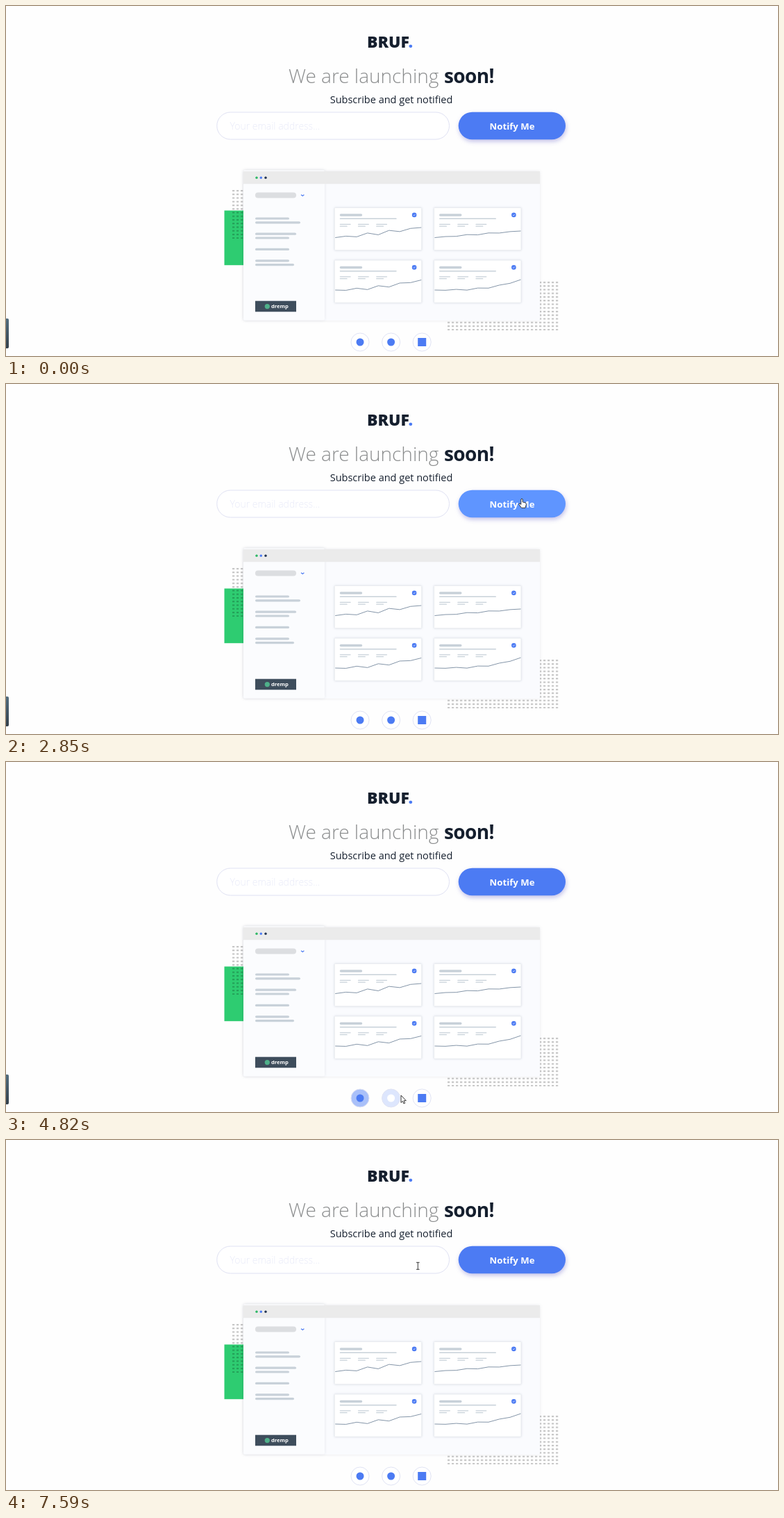
Recreate the animation shown at these times as an HTML page. Size 1112 by 504 pixels, loop 8000 ms.

```html
<!DOCTYPE html>
<html lang="en">
<head>
<meta charset="utf-8">
<title>Launching soon</title>
<style>
  html, body { margin: 0; width: 100%; height: 100%; overflow: hidden; background: #fefefe; }
  svg { display: block; width: 100%; height: 100%; }
  text { font-family: "Open Sans", "Noto Sans", sans-serif; }
  .light { font-weight: 300; }
  .bold { font-weight: 700; }
  .bar { fill: #c8d1d9; }
  .chart { fill: none; stroke: #8495a8; stroke-width: 1; stroke-linejoin: round; }
  .card { fill: #fff; stroke: #e9ecf0; filter: drop-shadow(0 0 1.5px rgba(60, 80, 110, .16)); }
  .panel { filter: drop-shadow(0 0 2px rgba(40, 50, 80, .1)); }
  .ring { stroke: #e0e3f4; }
  #button { filter: drop-shadow(1px 3px 3px rgba(70, 65, 190, .32)); }
  #cursor > * { display: none; stroke: #222; stroke-width: .9; fill: #fff; stroke-linejoin: round; }
  #tab { animation: tab 8s step-end infinite; }
  @keyframes tab { 91% { opacity: 0; } }
</style>
</head>
<body>
<svg viewBox="0 0 1112 504">
  <defs>
    <pattern id="dots" width="6" height="5.25" patternUnits="userSpaceOnUse">
      <rect width="3.2" height="2" fill="#000" opacity=".23"/>
    </pattern>
    <linearGradient id="slate" x2="0" y2="1">
      <stop stop-color="#526d7e"/><stop offset="1" stop-color="#323f4a"/>
    </linearGradient>
  </defs>

  <text x="520" y="59.5" font-size="23" font-weight="800" fill="#151f2e">BRUF<tspan fill="#4c7bf3">.</tspan></text>
  <text class="light" x="407" y="111" font-size="28" fill="#8a8c8d">We are launching</text>
  <text class="bold" x="631" y="111" font-size="28" letter-spacing="-.6" fill="#151f2e">soon!</text>
  <text x="555" y="139.5" font-size="14.5" text-anchor="middle" fill="#151f2e">Subscribe and get notified</text>

  <rect x="303.8" y="153" width="334.7" height="39" rx="19.5" fill="#fff" stroke="#dfe1f3"/>
  <text class="light" x="322.5" y="177.5" font-size="14" fill="#e8eaf8">Your email address...</text>
  <rect id="button" x="651.7" y="152.7" width="154.3" height="39.6" rx="19.8"/>
  <text class="bold" x="729" y="177.5" font-size="13.2" text-anchor="middle" fill="#fff">Notify Me</text>

  <rect x="314.5" y="294.5" width="30" height="78.7" fill="#2ecc71"/>
  <g fill="url(#dots)">
    <rect width="18" height="70" transform="translate(326 265)"/>
    <rect width="161" height="70" transform="translate(636 397)"/>
  </g>
  <g class="panel">
    <rect x="342" y="238" width="427" height="215" rx="2" fill="#fafbfe"/>
    <rect x="342" y="236.5" width="117" height="216" rx="2" fill="#fbfcfe" class="panel"/>
    <path d="M342 238H769V256.3H342Z" fill="#ebebeb"/>
  </g>
  <circle cx="361" cy="247.2" r="1.7" fill="#2eb865"/>
  <circle cx="367.3" cy="247.2" r="1.7" fill="#4c7bf3"/>
  <circle cx="374" cy="247.2" r="1.7" fill="#243552"/>
  <rect x="359" y="268.6" width="59" height="7.8" rx="3.9" fill="#dcdee1"/>
  <path d="M425 271.8l2.2 1.7 2.2-1.7" fill="none" stroke="#4c7bf3" stroke-width="1.1"/>
  <g id="menu"></g>
  <rect x="359" y="424.7" width="59" height="15.6" fill="#3e4d5c"/>
  <circle cx="376.3" cy="432.6" r="3.6" fill="#4fb08a"/>
  <text class="bold" x="382" y="435.4" font-size="7.6" fill="#fff">dremp</text>
  <g id="cards"></g>
  <g id="social"></g>

  <path id="tab" d="M0 450H2Q4 450 4 452V491Q4 493 2 493H0Z" fill="url(#slate)"/>
  <g id="cursor">
    <path d="M0 0V10.5L2.4 8.3 4 12 5.7 11.2 4.1 7.7H7.3Z"/>
    <path d="M-1.2 1Q0-.8 1.2 1V5L5 5.8Q6.5 6.4 6.3 8.5L5 13.4H-.5L-4 8.6Q-4.6 7-3 7L-1.2 8.5Z"/>
    <path d="M-2.3-5H2.3M-2.3 5H2.3M0-5V5" style="fill:none"/>
  </g>
</svg>
<script>
const el = id => document.getElementById(id);
const LOOP = 8000;

const bar = (x, y, w, h) =>
  `<rect class="bar" x="${x}" y="${y}" width="${w}" height="${h}" rx="${h / 2}"/>`;

function menu(groups) {
  let y = 304.4, out = '';
  for (const widths of groups) {
    for (const w of widths) {
      out += bar(359, y, w, 3.2);
      y += 5.8;
    }
    y += 10.6;
  }
  return out;
}
el('menu').innerHTML = menu([[49, 65], [59, 49], [49], [49, 56]]);

// A rising trend with a zigzag that is strongest in the middle
function chart({ rise, bend, swing }) {
  return Array.from({ length: 9 }, (_, i) => {
    const k = i / 8, zigzag = swing * (i % 2 ? -1 : 1) * Math.sin(Math.PI * k);
    return `${1 + 124 * k},${43 - rise * k ** bend + zigzag}`;
  }).join(' ');
}

function card(trend, i) {
  const x = 473.2 + i % 2 * 143.3, y = 290.5 + (i >> 1) * 75.5;
  return `<g transform="translate(${x} ${y})">
    <rect class="card" width="125.5" height="61.3" rx="1"/>
    ${bar(7.5, 8.8, 32.5, 3.4)}${bar(7.5, 15, 82, 1.5)}
    ${[0, 1, 2].map(c => bar(7.5 + c * 26.2, 23.2, 16, 1.2) + bar(7.5 + c * 26.2, 26.1, 11, 1.2)).join('')}
    <circle cx="114.9" cy="10.4" r="3.3" fill="#4c7bf3"/>
    <path d="M113.5 10.4l1 1 1.8-1.9" fill="none" stroke="#fff" stroke-width=".7"/>
    <polyline class="chart" points="${chart(trend)}"/></g>`;
}
el('cards').innerHTML = [
  { rise: 14.5, bend: 1.2, swing: 2.3 },
  { rise: 9.5, bend: 1, swing: .8 },
  { rise: 14.5, bend: 1.8, swing: -2 },
  { rise: 15, bend: 3, swing: -1 }
].map(card).join('');

// Hover spans: [enter, leave] in ms
const buttonHover = [[1205, 3290]];
const icons = [
  [[4270, 4670]],
  [[4766, 4822], [5220, 5866]],
  [[5905, 6570]]
].map((hover, i) => ({ x: 510 + i * 44.6, hover }));

el('social').innerHTML = icons.map(({ x }, i) => `<g transform="translate(${x} 484)">
  <circle class="ring" r="13"/>` +
  (i < 2 ? '<circle r="5.5"/>' : '<rect x="-6" y="-6" width="12" height="12"/>') + '</g>').join('');
icons.forEach((icon, i) => [icon.ring, icon.mark] = el('social').children[i].children);

// Pointer legs; arc bows a leg sideways and up
const entry = { x: 1085, y: 475 };
const legs = [
  { from: 390, to: 1070, x: 729, y: 119 },
  { from: 1180, to: 1390, x: 722, y: 164 },
  { from: 2220, to: 2850, x: 743, y: 165, arc: 56 },
  { from: 3180, to: 3930, x: 560, y: 419 },
  { from: 4000, to: 4410, x: 518, y: 485 },
  { from: 4600, to: 4820, x: 569, y: 480 },
  { from: 5150, to: 5400, x: 556, y: 484 },
  { from: 5650, to: 5890, x: 591, y: 486 },
  { from: 5960, to: 6100, x: 600, y: 484 },
  { from: 6520, to: 6730, x: 593.3, y: 181.3 }
];

const mix = (a, b, k) => a + (b - a) * k;
const clamp = k => Math.min(1, Math.max(0, k));
const smooth = k => k * k * (3 - 2 * k);
const color = (from, to, k) => `rgb(${from.map((c, i) => Math.round(mix(c, to[i], k)))})`;
const WHITE = [255, 255, 255], BLUE = [76, 123, 243], BRIGHT = [95, 149, 255];

function fade(t, spans, duration) {
  const ramp = from => clamp((t - from) / duration);
  return spans.reduce((sum, [on, off]) =>
    sum + Math.max(0, Math.min(ramp(on), (off - on) / duration) - ramp(off)), 0);
}

function pointerAt(t) {
  let { x, y } = entry;
  for (const leg of legs) {
    const k = smooth(clamp((t - leg.from) / (leg.to - leg.from)));
    const bow = (leg.arc || 0) * Math.sin(Math.PI * k);
    x = mix(x, leg.x, k) + bow * .9;
    y = mix(y, leg.y, k) - bow;
  }
  return [x, y];
}

function shapeAt(x, y) {
  const inRow = y > 153 && y < 192;
  if (inRow && x > 304 && x < 638) return 2;
  const overIcon = icons.some(icon => Math.hypot(x - icon.x, y - 484) < 13.5);
  return overIcon || inRow && x > 652 && x < 806 ? 1 : 0;
}

function draw(t) {
  el('button').style.fill = color(BLUE, BRIGHT, fade(t, buttonHover, 240));
  for (const { ring, mark, hover } of icons) {
    ring.style.fill = color(WHITE, BLUE, fade(t, hover, 290));
    mark.style.fill = hover.some(([on, off]) => t >= on && t < off) ? '#fff' : '#4c7bf3';
  }
  const cursor = el('cursor'), [x, y] = pointerAt(t), shape = shapeAt(x, y);
  cursor.style.display = t < legs[0].from ? 'none' : '';
  cursor.setAttribute('transform', `translate(${x} ${y})`);
  [...cursor.children].forEach((c, i) => c.style.display = i === shape ? 'inline' : 'none');
}

const start = performance.now();
(function tick() {
  draw((performance.now() - start) % LOOP);
  requestAnimationFrame(tick);
})();
</script>
</body>
</html>
```
